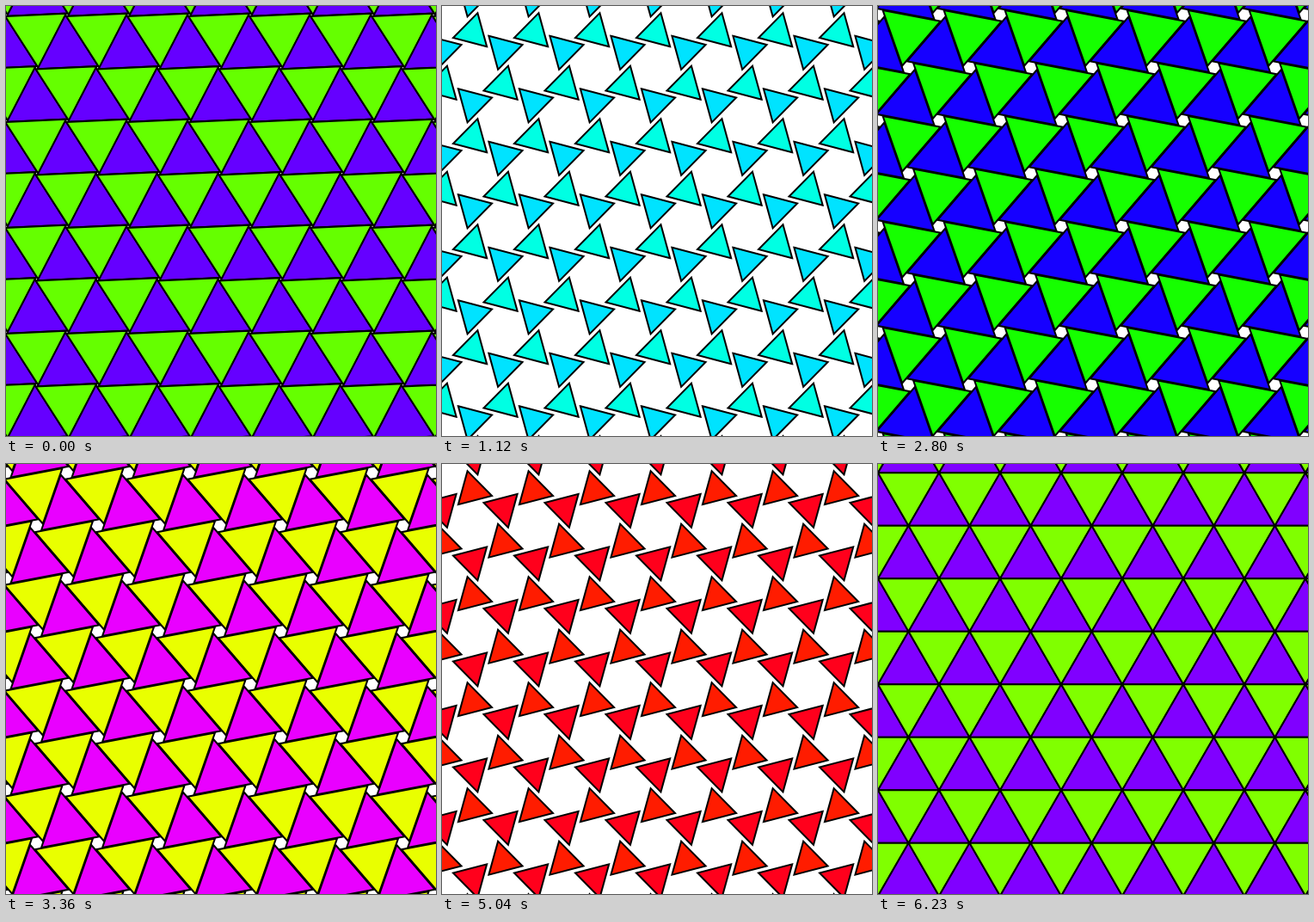
Recreate the animation shown at these times as an HTML page with a canvas. Size 500x500 px, loop 6.3 s.

```html
<!DOCTYPE html>
<html>
<head>
<meta charset="utf-8">
<style>
  html, body { margin: 0; overflow: hidden; background: #fff; }
  canvas { display: block; }
</style>
</head>
<body>
<canvas id="stage" width="500" height="500"></canvas>
<script>
const ctx = document.getElementById('stage').getContext('2d');
const TAU = 2 * Math.PI;
const STEPS = 90, STEP_MS = 70;
const RADIUS = 41, SIDE = RADIUS * Math.sqrt(3), ROW = RADIUS * 1.5, TOP = 10.25;

function triangle(x, y, radius, angle, hue) {
  ctx.beginPath();
  for (let i = 0; i < 3; i++) {
    const a = angle + i * TAU / 3;
    ctx.lineTo(x + radius * Math.cos(a), y + radius * Math.sin(a));
  }
  ctx.closePath();
  ctx.fillStyle = `hsl(${hue}, 100%, 50%)`;
  ctx.fill();
  ctx.stroke();
}

function draw(now) {
  const step = (Math.floor(now / STEP_MS) + 1) % STEPS;
  const phase = TAU * step / STEPS;
  const radius = RADIUS * (0.75 + 0.25 * Math.cos(2 * phase));
  const spin = -phase * 2 / 3;
  const hue = 90 + 90 * Math.sin(phase);

  ctx.fillStyle = '#fff';
  ctx.fillRect(0, 0, 500, 500);
  ctx.strokeStyle = '#000';
  ctx.lineWidth = 2;
  for (let row = -1; row < 9; row++) {
    const y = TOP + row * ROW;
    for (let col = -1; col < 9; col++) {
      const x = (col + (row & 1) / 2) * SIDE;
      triangle(x, y + RADIUS, radius, spin - TAU / 4, 360 - hue);
      triangle(x + SIDE / 2, y + RADIUS / 2, radius, spin + TAU / 4, hue);
    }
  }
}

function tick() {
  draw(performance.now());
  requestAnimationFrame(tick);
}
tick();
</script>
</body>
</html>
```
